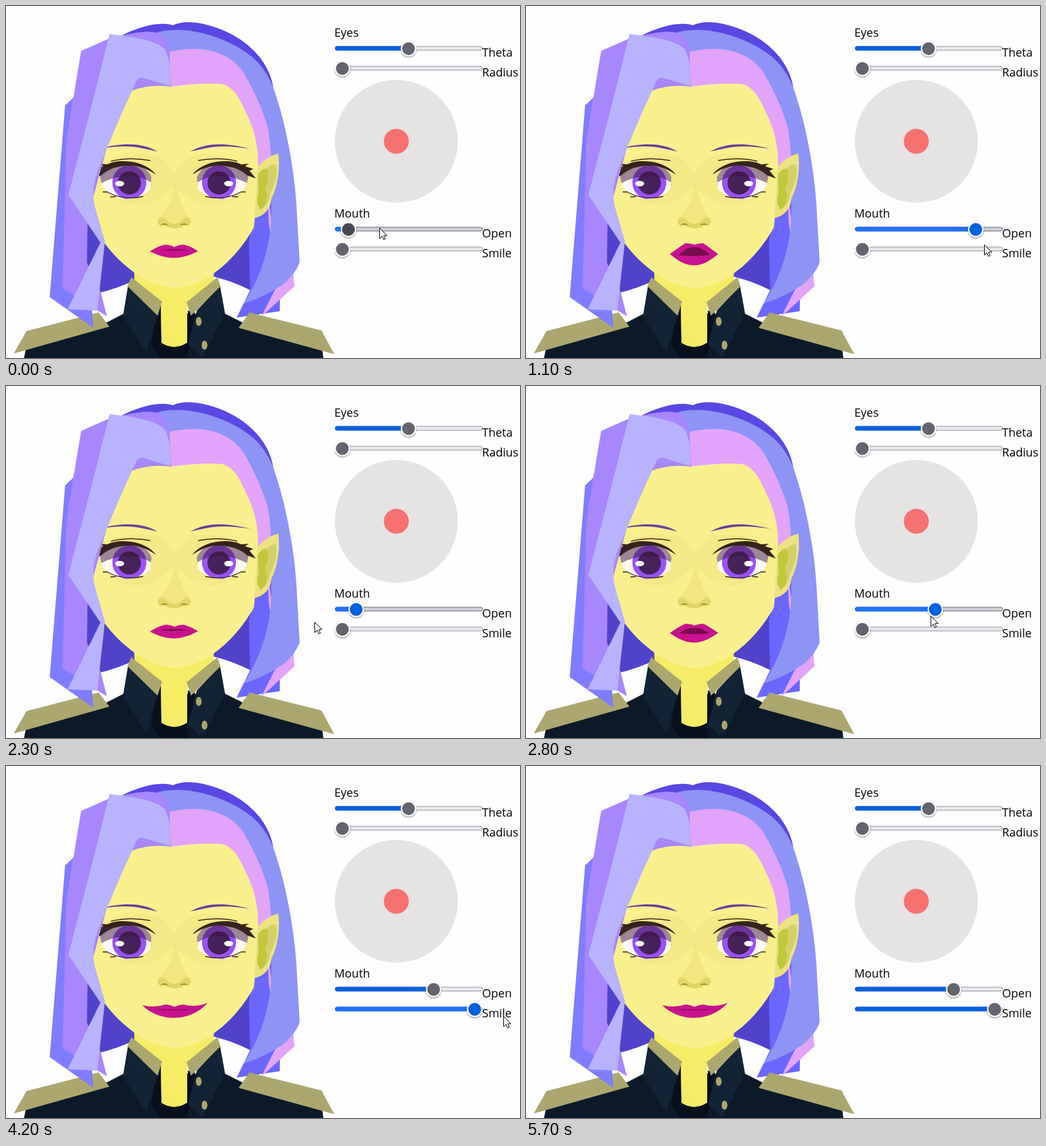
These frames come from a looping animation (800x549 px, 5.8 s). An HTML page:

```html
<!DOCTYPE html>
<html lang="en">
<head>
<meta charset="utf-8">
<title>Face controls</title>
<style>
  html, body { margin: 0; width: 100%; height: 100%; overflow: hidden; background: #fefefe; }
  svg { display: block; width: 800px; height: 549px; }
  text { font: 18px "Open Sans", "Noto Sans", sans-serif; fill: #000; }
  .track { fill: #e9e9ed; stroke: #8f8f9d; }
  .fill { fill: #0060df; }
  .thumb { fill: #64646f; }
  .hover .track, .active .track { fill: #d0d0d7; stroke: #676774; }
  .hover .fill, .active .fill { fill: #1f72f8; }
  .hover .thumb { fill: #484851; }
  .active .thumb { fill: #0060df; }
  .trim { fill: #aba76e; }
  .lash { fill: #35231c; }
  .line { fill: none; stroke: #35231c; stroke-width: 1.3; }
</style>
</head>
<body>
<svg viewBox="0 0 800 549">
  <defs>
    <clipPath id="eyeShape">
      <path d="M297 267C308 240 360 234 378 262L374 281Q362 299 338 301Q312 300 299 286Z"/>
    </clipPath>
    <filter id="shade" x="-30%" y="-30%" width="160%" height="170%">
      <feDropShadow dx="0" dy="1.5" stdDeviation="1.3" flood-color="#000" flood-opacity=".45"/>
    </filter>
    <g id="eye">
      <g clip-path="url(#eyeShape)">
        <path fill="#fdf9f6" d="M290 230h100v80h-100z"/>
        <circle cx="331.500" cy="275" r="26.500" fill="#9a52f5"/>
        <circle cx="331.500" cy="276" r="18" fill="#472159"/>
        <path fill="#3c143c" opacity=".5" d="M290 230H390V279L377 277Q332 254 298 275L290 279Z"/>
      </g>
      <ellipse cx="346.500" cy="277" rx="7" ry="4.200" fill="#fff"/>
      <path class="lash" d="M290 263C302 248 322 242 341 242C352 242 360 244 366 247L378 246L372 250L385 254L379 257L389 269L375 264C362 252 346 249 328 249C311 250 300 257 290 263Z"/>
      <path class="line" d="M299 241Q331 235 360 242"/>
      <path class="line" d="M310 297Q340 304 366 290L373 290M352 297L361 298"/>
    </g>
    <path id="brow" fill="#6a3d9e" d="M287 227C308 215 335 211 381 223C350 218 330 218 315 221Q300 224 287 227Z"/>
  </defs>

  <!-- back hair -->
  <path fill="#5042cb" d="M115 290L110 400L146 447Q172 441 200 428L323 422Q352 429 380 443L395 300Z"/>
  <path fill="#6b66ff" d="M387 325L378 366L380 443L359 486L426 476L430 290H390Z"/>
  <path fill="#e4a3fa" d="M407 290L414 340H430L447 415L449 437L397 485L425 430L409 340Z"/>
  <path fill="#5947e4" d="M176 48C203 34 236 23 260 30C276 22 299 25 322 32C370 47 409 82 416 127L340 110L200 90Z"/>

  <!-- neck and uniform -->
  <path fill="#0c1929" d="M28 549L34 520L150 497L183 480H341L375 497L490 520L494 549Z"/>
  <path fill="#f7ec65" d="M199 400L200 430L241 470V525Q262 538 282 525V470L323 430L324 400Z"/>
  <path fill="#08101d" d="M235 475L241 462L242 526Q262 538 282 526L283 475L294 478L282 549H240L226 527Z"/>
  <path fill="#f7ec65" d="M241 462L242 525Q262 538 281 525L282 462Z"/>
  <path fill="#112334" d="M190 436L182 484L219 541L239 470ZM333 436L341 480L305 549L283 528L297 475Z"/>
  <path class="trim" d="M195 423L243 461L236 483L189 437ZM329 423L281 462L288 483L334 437Z"/>
  <path class="trim" d="M12 542L32 507L144 478L161 500ZM511 543L491 506L379 478L362 502Z"/>
  <ellipse class="trim" cx="300" cy="492" rx="4.500" ry="7"/>
  <ellipse class="trim" cx="309" cy="529" rx="4.500" ry="7"/>

  <!-- face, with the right side of the hair over it -->
  <path fill="#f9f08d" d="M190 130Q230 121 257 126Q310 119 338 122Q371 127 382 160Q391 190 392 235V270L386 345C366 382 320 437 262 440C215 437 170 396 148 362L130 290L150 235Z"/>
  <path fill="#8d94f5" d="M236 41C268 32 310 40 345 56C378 72 401 89 416 127C431 170 447 235 452 310L457 400Q449 421 430 435Q402 454 370 464C396 423 413 375 413 320V245L395 200L350 100L252 80Z"/>
  <path fill="#e4a3fa" d="M252 72C302 60 348 69 371 106C390 140 398 160 404 178C410 195 412 220 413 245L392 252V235C391 205 381 180 368 155Q356 128 338 122Q310 119 255 126Z"/>
  <path fill="#ede184" d="M391 251Q407 234 424 230Q428 270 413 301Q411 324 387 331Z"/>
  <path fill="#d3d069" d="M392 270Q408 246 420 247Q424 270 411 292Q408 315 394 317Z"/>
  <path fill="#c2c73c" d="M392 263Q401 250 407 256Q409 274 403 284Q411 303 397 318Q387 308 393 291Z"/>
  <path fill="#f5e886" d="M142 258C156 230 230 222 250 244L262 262L274 244C294 222 369 230 378 262C382 292 350 312 321 311C296 310 278 296 262 280C246 296 228 310 203 311C172 311 145 292 142 258Z"/>
  <path fill="#f4e580" d="M262 273C260 305 249 318 238 330Q232 341 242 344L262 343L282 344Q292 340 286 330C275 318 270 300 262 273Z"/>
  <path fill="#e2d567" d="M236 337Q238 328 246 330Q252 338 262 340Q272 338 278 330Q287 328 288 337Q286 344 279 341Q270 347 262 347Q254 347 245 341Q237 344 236 337Z"/>
  <path fill="#91841b" d="M240 342Q247 336 253 342Q247 340 240 342ZM270 342Q277 336 284 342Q277 340 270 342Z"/>
  <use href="#eye"/>
  <use href="#eye" transform="matrix(-1 0 0 1 523.500 0)"/>
  <use href="#brow"/>
  <use href="#brow" transform="matrix(-1 0 0 1 523 0)"/>
  <path id="lips" fill="#c9128f"/>
  <path id="gap" fill="#780d4d"/>

  <!-- front hair -->
  <path fill="#807cff" d="M107 141L92 155L68 454L136 502L133 465L100 440Z"/>
  <path fill="#a886fd" d="M117 70L160 51L180 46C205 40 228 38 240 43C252 53 256 68 255 85L257 126Q225 121 196 132L160 210L127 330L126 400L147 445L157 484L88 440L94 210L105 142Z"/>
  <path fill="#b8b2ff" d="M161 44C203 48 238 55 248 69C257 87 256 107 256 125L213 112Q205 112 203 117L196 132C175 178 157 222 141 262C134 284 135 302 140 319L154 367L142 475L96 473L147 369L97 295L141 125Z"/>

  <!-- controls -->
  <text x="511" y="48">Eyes</text>
  <text x="511" y="330">Mouth</text>
  <circle cx="607.500" cy="211" r="95.700" fill="#e5e4e2"/>
  <circle cx="607.500" cy="211" r="19.500" fill="#f87171"/>
  <g id="sliders"></g>
  <path id="cursor" fill="#fff" stroke="#000" d="M.5 .5V16.500L4.300 13L6.800 18.500L9.300 17.400L6.900 12H12Z"/>
</svg>
<script>
  const LOOP = 5800, STEP = 100, MIN = 523.5, RANGE = 206;
  const $ = id => document.getElementById(id);

  function slider(label, y, value) {
    const g = document.createElementNS('http://www.w3.org/2000/svg', 'g');
    g.innerHTML =
      `<rect class="track" x="512.500" y="${y - 3}" width="229" height="6" rx="3"/>
       <rect class="fill" x="512" y="${y - 3.5}" height="7" rx="3.500"/>
       <g filter="url(#shade)"><circle cy="${y + 0.5}" r="12" fill="#fff"/></g>
       <circle class="thumb" cy="${y + 0.5}" r="10"/>
       <text x="741" y="${y + 12.5}">${label}</text>`;
    $('sliders').append(g);
    const set = (v, state = '') => {
      g.setAttribute('class', state);
      g.querySelector('.fill').setAttribute('width', v * 230);
      g.querySelectorAll('circle').forEach(c => c.setAttribute('cx', MIN + v * RANGE));
    };
    set(value);
    return set;
  }

  slider('Theta', 66, 0.5);
  slider('Radius', 97, 0);
  const setOpen = slider('Open', 348, 0);
  const setSmile = slider('Smile', 379, 0);

  // time, cursor x, cursor y, open thumb x, smile thumb x
  const keys = [
    [0, 581, 346, 533, MIN],
    [200, 535, 348, 533, MIN],
    [300, 535, 349, 533, MIN],
    [1100, 713, 372, 700, MIN],
    [1300, 742, 373, 729, MIN],
    [1500, 742, 373, 729, MIN],
    [2300, 480, 368, 545, MIN],
    [2400, 480, 368, MIN, MIN],
    [2900, 667, 356, 665.5, MIN],
    [3000, 667, 356, 665.5, MIN],
    [3300, 530, 377, 665.5, MIN],
    [3400, 526, 379, 665.5, MIN],
    [4200, 774, 390, 665.5, 729.5],
    [4400, 778, 392, 665.5, 729.5],
    [4800, 815, 405, 665.5, 729.5],
    [LOOP, 815, 405, 665.5, 729.5]
  ];

  const mix = (a, b, k) => a.map((v, i) => v + (b[i] - v) * k);

  function pose(t) {
    const i = keys.findIndex(k => k[0] > t);
    const a = keys[i - 1], b = keys[i];
    return mix(a, b, (t - a[0]) / (b[0] - a[0]));
  }

  // corners, upper curve controls, peaks, dip, lower control, inner corners, inner top and bottom
  const closed = [224, 382.5, 299, 382, 237, 374, 286, 374, 372.5, 376, 395.5, 240, 284, 380, 379, 382];
  const opened = [224, 387.5, 299, 387.5, 239, 376, 284, 376, 369.5, 371.5, 413, 237, 287, 390, 361, 393];
  const smiling = [212, 373, 314, 369.5, 231, 378, 294, 377, 372, 375.5, 400, 230, 296, 379, 380.5, 383];

  function drawMouth(open, smile) {
    const [lx, ly, rx, ry, ux, uy, vx, vy, peak, dip, low, il, ir, iy, it, ib] =
      mix(mix(closed, opened, open), smiling, smile);
    $('lips').setAttribute('d',
      `M${lx} ${ly}Q${ux} ${uy} 248 ${peak}Q255 ${peak} 262 ${dip}Q269 ${peak} 276 ${peak}` +
      `Q${vx} ${vy} ${rx} ${ry}C${rx - 27} ${low} ${lx + 27} ${low} ${lx} ${ly}Z`);
    $('gap').setAttribute('d', `M${il} ${iy}Q262 ${it} ${ir} ${iy}Q262 ${ib} ${il} ${iy}Z`);
  }

  function dragState(t, hover, grab, release) {
    if (t >= grab && t < release) return 'active';
    return t >= hover && t < grab ? 'hover' : '';
  }

  const start = performance.now();
  function draw(now) {
    const t = Math.floor(Math.max(0, now - start) % LOOP / STEP) * STEP;
    const [, x, y, ox, sx] = pose(t);
    const open = (ox - MIN) / RANGE, smile = (sx - MIN) / RANGE;
    setOpen(open, dragState(t, 0, 300, 3000));
    setSmile(smile, dragState(t, 3200, 3400, 4400));
    drawMouth(open, smile);
    $('cursor').setAttribute('transform', `translate(${x} ${y})`);
    requestAnimationFrame(draw);
  }
  draw(start);
</script>
</body>
</html>
```
